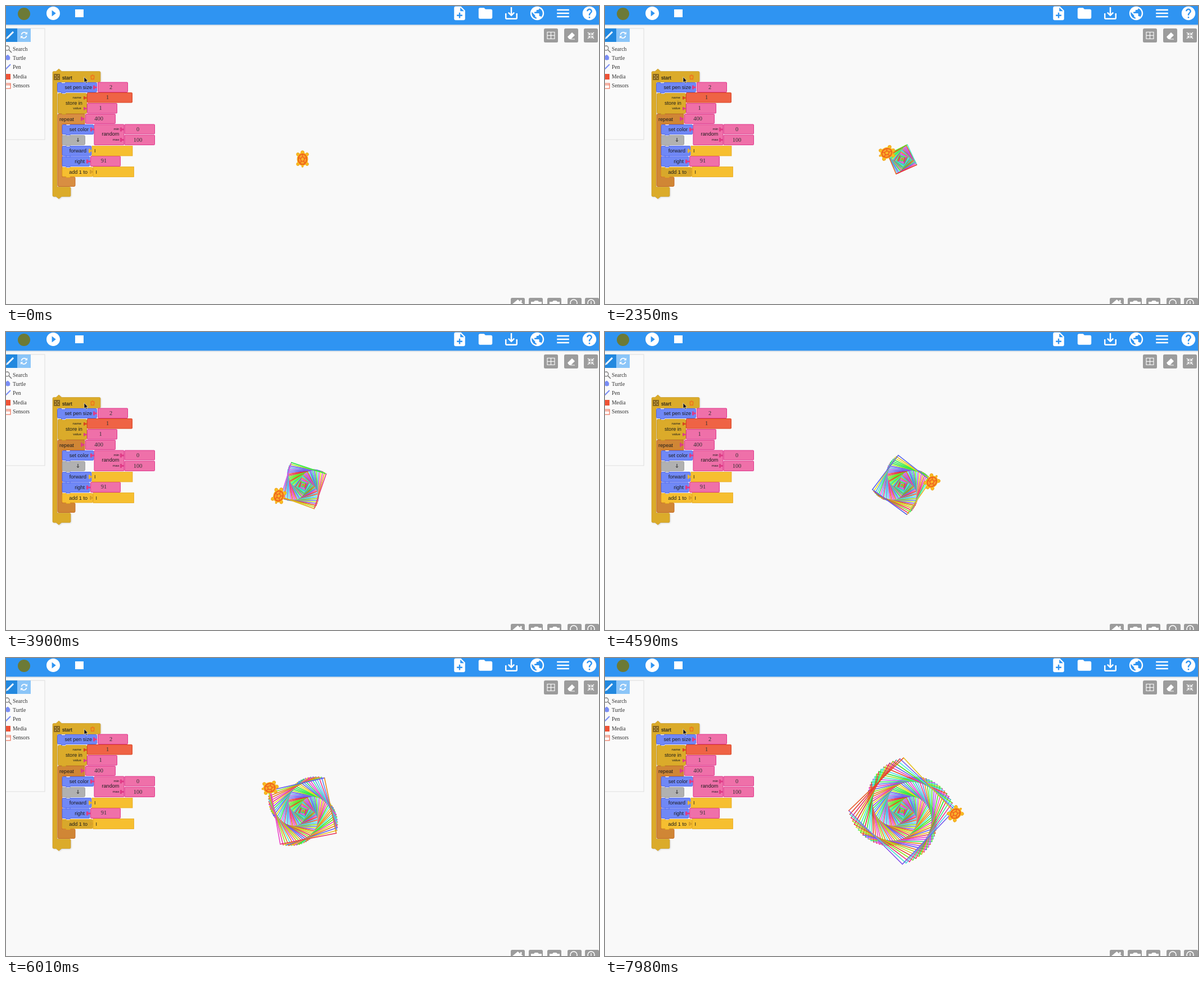
An HTML page with a canvas for the animation above (8 s loop, 1055x531 px).

```html
<!DOCTYPE html>
<html lang="en">
<head>
<meta charset="utf-8">
<title>Turtle spiral</title>
<style>
  html, body { margin: 0; width: 100%; height: 100%; overflow: hidden; background: #f9f9f9; }
  svg, canvas { position: absolute; left: 0; top: 0; }
  text { font: 9.1px "Liberation Sans", sans-serif; fill: #1c1c1c; }
  .serif { font: 10.5px "Liberation Serif", serif; fill: #333; }
  .menu { font: 9.7px "Liberation Serif", serif; fill: #333; }
  .tiny { font-size: 6.2px; }
</style>
</head>
<body>
<svg id="ui" width="1055" height="531" viewBox="0 0 1055 531"></svg>
<canvas id="stage" width="1055" height="531"></canvas>
<script>
const BLUE = ['#7088f6', '#4a63ee'], PINK = ['#ef70a9', '#e0358c'], RED = ['#ef6345', '#d8431f'],
      GOLD = ['#dbab2a', '#c6961c'], YELLOW = ['#f6bf30', '#e6a71f'], GREY = ['#b1b1b1', '#9a9a9a'],
      ORANGE = ['#d88e42', '#c4641f'];

const rect = (x, y, w, h, fill, extra = '') =>
  `<rect x="${x}" y="${y}" width="${w}" height="${h}" fill="${fill}" ${extra}/>`;
const path = (d, fill, extra = '') => `<path d="${d}" fill="${fill}" ${extra}/>`;
const line = (d, color, width, extra = '') =>
  path(d, 'none', `stroke="${color}" stroke-width="${width}" ${extra}`);
const text = (x, y, str, cls = '', anchor = 'start') =>
  `<text x="${x}" y="${y}" class="${cls}" text-anchor="${anchor}">${str}</text>`;
const icon = (cx, cy, scale, d) =>
  `<path transform="translate(${cx} ${cy}) scale(${scale}) translate(-12 -12)" fill="#fff" d="${d}"/>`;

// Value block: plain box with a centred serif number
const value = (x, y, w, h, [fill, edge], str, tx) =>
  rect(x + .5, y + .5, w - 1, h - 1, fill, `rx="1" stroke="${edge}"`) + text(tx, y + 12.3, str, 'serif', 'middle');

// Flow block: rounded box with a tab below
const block = (x, y, w, h, [fill, edge], id = '') =>
  path(`M${x + 2.5} ${y + .5}h5v1.5h7v-1.5h${w - 17}q2 0 2 2v${h - 5}q0 2 -2 2h${17 - w}v1.5h-7v-1.5h-5q-2 0 -2 -2v${5 - h}q0 -2 2 -2z`,
    fill, `stroke="${edge}" stroke-width=".9" id="${id}"`);

const plug = (x, y, color, s = 1) =>
  path(`M${x} ${y}h${3 * s}v${2 * s}h${4 * s}v${3 * s}h${-4 * s}v${2 * s}h${-3 * s}z`, color);

function toolbar() {
  const icons = [
    [807, 'M14 2H6c-1.1 0-2 .9-2 2v16c0 1.1.9 2 2 2h12c1.1 0 2-.9 2-2V8zM16 16h-3v3h-2v-3H8v-2h3v-3h2v3h3zM13 9V3.500L18.500 9z'],
    [853, 'M10 4H4c-1.100 0-2 .9-2 2v12c0 1.100.9 2 2 2h16c1.100 0 2-.9 2-2V8c0-1.100-.9-2-2-2h-8z'],
    [899, 'M19 12v7H5v-7H3v7c0 1.100.9 2 2 2h14c1.100 0 2-.9 2-2v-7zM13 12.670l2.590-2.580L17 11.500l-5 5-5-5 1.410-1.410L11 12.670V3h2z'],
    [945, 'M12 2C6.480 2 2 6.480 2 12s4.480 10 10 10 10-4.480 10-10S17.520 2 12 2zM11 19.930c-3.950-.49-7-3.850-7-7.930 0-.62.080-1.210.210-1.790L9 15v1c0 1.100.9 2 2 2zM17.900 17.390c-.26-.81-1-1.390-1.900-1.390h-1v-3c0-.55-.45-1-1-1H8v-2h2c.55 0 1-.45 1-1V7h2c1.100 0 2-.9 2-2v-.41c2.930 1.190 5 4.060 5 7.410 0 2.080-.8 3.970-2.100 5.390z'],
    [991, 'M3 18h18v-2H3zM3 13h18v-2H3zM3 8h18V6H3z'],
    [1038, 'M12 2C6.480 2 2 6.480 2 12s4.480 10 10 10 10-4.480 10-10S17.520 2 12 2zM13 19h-2v-2h2zM15.070 11.250l-.9.920C13.450 12.900 13 13.500 13 15h-2v-.5c0-1.100.45-2.100 1.170-2.830l1.240-1.260c.37-.36.59-.86.59-1.410 0-1.100-.9-2-2-2s-2 .9-2 2H8c0-2.210 1.790-4 4-4s4 1.790 4 4c0 .88-.36 1.680-.93 2.250z'],
  ];
  return rect(0, 33, 1055, 1, '#a3c6e6') + rect(0, 34, 1055, 1, '#e0e6eb') + rect(0, 35, 1055, 1, '#f1f1f1') +
    rect(0, 0, 1055, 33, '#2f94f2') +
    '<circle cx="32" cy="14" r="11" fill="#6c7a36"/>' +
    icon(84, 13, 1.2, 'M12 2C6.480 2 2 6.480 2 12s4.480 10 10 10 10-4.480 10-10S17.520 2 12 2zM10 16.500v-9l6 4.500z') +
    rect(123, 6, 15, 14, '#fff') +
    icons.map(([x, d]) => icon(x, 13, x === 991 ? 1.2 : 1.22, d)).join('');
}

function palette() {
  const names = ['Search', 'Turtle', 'Pen', 'Media', 'Sensors'];
  return rect(-1, 40, 70, 198, '#fafafa', 'stroke="#dedede"') +
    rect(0, 40, 20, 24, '#2288df') + rect(20, 40, 24, 24, '#8bc5f8') +
    line('M3.500 55.500L13 46', '#fff', 3) + path('M0 59l2 -5 3 3z', '#fff') +
    line('M27.500 51a5 5 0 0 1 9 -2M36.500 53a5 5 0 0 1 -9 2', '#fff', 1.6) +
    path('M38 46v4.500h-4.500zM26 58v-4.500h4.500z', '#fff') +
    names.map((s, i) => text(12, [79.5, 95.5, 111.5, 128.5, 145][i], s, 'menu')).join('') +
    '<circle cx="2" cy="75" r="4" fill="none" stroke="#777" stroke-width="1.3"/>' + line('M5 78l5 5', '#777', 1.6) +
    '<ellipse cx="3" cy="92" rx="4" ry="4.500" fill="#7a8ef5"/>' + line('M-1 89l8 6M3 87l2 9M7 91l-3 4', '#7a8ef5', 1.8) +
    line('M-1 113L8 104', '#7a8ef5', 2) +
    rect(-2, 121, 10, 10, '#ee5336') + rect(-3, 138, 11, 9, '#fff', 'stroke="#ee7a62" stroke-width="1.3"') +
    line('M-3 140.500h11', '#ee7a62', 1.4);
}

function sideButtons() {
  const box = (x, y) => rect(x, y, 25, 25, '#9c9c9c', 'rx="2.500"');
  return [957, 993, 1028].map(x => box(x, 40)).join('') +
    line('M963 46.500h13v12h-13zM969.500 46.500v12M963 52.500h13', '#fff', 1.1) +
    path('M999 55l8 -8 5 5 -7 7h-3z', '#fff') + line('M1004 59h8', '#fff', 1) +
    line('M1035 47l4 4v-3.500M1039 51h-3.500M1046 47l-4 4v-3.500M1042 51h3.500M1035 58l4 -4v3.500M1039 54h-3.500M1046 58l-4 -4v3.500M1042 54h3.500', '#fff', 1.2) +
    [898, 930, 963, 999, 1030].map(x => box(x, 520)).join('') +
    path('M901 531l9.500 -8 9.500 8z', '#fff') + rect(915, 524, 2.500, 4, '#fff') +
    path('M934 531v-4h5l2 -2h5l2 2h5v4zM967 531v-4h5l2 -2h5l2 2h4v4z', '#fff') +
    [1010, 1041].map(x => `<circle cx="${x}" cy="529" r="6" fill="none" stroke="#fff" stroke-width="1.600"/>`).join('') +
    line('M1041 526v5', '#fff', 1.4);
}

function program() {
  const [gold, goldEdge] = GOLD;
  const pinkPlug = (x, y, s) => plug(x, y, '#df3b86', s);
  return path('M85 116.500h4l5 -4.500 5 4.500h67q2 0 2 2v15q0 2 -2 2h-75v187h22q2 0 2 2v13q0 2 -2 2h-14l-5 4 -5 -4h-4q-2 0 -2 -2v-219q0 -2 2 -2z',
      gold, `stroke="${goldEdge}" stroke-width=".6" style="filter:drop-shadow(1px 1px 1px #0002)"`) +
    rect(85, 121, 11, 11, '#8a671c') +
    line('M87 123l2.500 2.500M94 123l-2.500 2.500M87 130l2.500 -2.500M94 130l-2.500 -2.500', '#f0d58a', 1) +
    `<g stroke="#1c1c1c" stroke-width=".15">${text(100, 130.5, 'start')}</g>` +
    '<ellipse cx="154" cy="127" rx="2.800" ry="3.500" fill="#e9a11f" stroke="#ec7620" stroke-width="1.500"/>' +
    line('M154 122v2M150.500 124l1 1M157.500 124l-1 1M151 131l1 -1M157 131l-1 -1', '#ec7620', 1.2) +

    path('M94 192.500h46v18h-40v94h21q2 0 2 2v13q0 2 -2 2h-27q-2 0 -2 -2v-125q0 -2 2 -2z',
      ORANGE[0], `stroke="${ORANGE[1]}" stroke-width=".9" id="repeat"`) +
    `<g id="repeatHot" display="none">${rect(99, 196, 36, 12, '#ecab2d') + rect(99, 304.5, 23, 16.5, '#f0ad2d', 'stroke="#e4761e"') +
      rect(99, 322, 15, 13, '#efb22c')}</g>` +
    text(95, 205.3, 'repeat') + pinkPlug(133, 197.5) + value(141, 192, 54, 18, PINK, '400', 165) +

    block(92, 155, 52, 37, GOLD) + text(106, 175.7, 'store in') +
    text(134, 164.7, 'name', 'tiny', 'end') + text(134, 184.2, 'value', 'tiny', 'end') +
    plug(138, 161, '#d8431f', .8) + pinkPlug(138, 180, .8) +
    value(144, 154, 81, 18.5, RED, '1', 180.5) + value(144, 173, 54, 18.5, PINK, '1', 168) +

    block(91, 136, 71, 18, BLUE) + text(153, 148, 'set pen size', '', 'end') + pinkPlug(155, 141.5) +
    value(163, 135.5, 54, 18.5, PINK, '2', 186.5) +

    block(99.5, 267.5, 50, 18.5, BLUE) + text(140, 280, 'right', '', 'end') + pinkPlug(143, 273.5) +
    value(150, 267, 54, 19, PINK, '91', 174) +
    block(99.5, 287, 55.5, 17.5, YELLOW, 'add') + text(145, 299, 'add 1 to', '', 'end') + plug(149, 292, '#d9a028') +
    rect(155, 286.500, 72.500, 18, YELLOW[0], `stroke="${YELLOW[1]}" stroke-width=".8"`) + text(159.5, 299, 'I') +
    block(99.5, 249, 53, 18, BLUE) + text(143, 261, 'forward', '', 'end') + plug(147, 254.5, '#e9b42e') +
    rect(153, 249.500, 72, 17.500, YELLOW[0], `stroke="${YELLOW[1]}" stroke-width=".8"`) + text(157, 261, 'I') +
    block(99.5, 230, 41.5, 18, GREY) + line('M128 235v6.500M126 239.500l2 2 2 -2', '#222', 1) +
    block(99.5, 211, 57, 18, BLUE) + text(147, 223, 'set color', '', 'end') + pinkPlug(150, 216.5) +

    rect(157, 211, 53, 36.500, PINK[0], `rx="1" stroke="${PINK[1]}"`) + text(170.5, 231.3, 'random') +
    text(201.5, 221.3, 'min', 'tiny', 'end') + text(201.5, 240.3, 'max', 'tiny', 'end') +
    pinkPlug(203, 216.5) + pinkPlug(203, 235) +
    value(210.5, 210.5, 54.5, 18, PINK, '0', 234.5) + value(210.5, 229.5, 54.5, 18.5, PINK, '100', 234.5) +
    path('M139 126.500v10l2.300 -2.200 1.700 3.700 1.600 -.7 -1.700 -3.600h3.100z', '#111', 'stroke="#fff" stroke-width=".6"');
}

document.getElementById('ui').innerHTML = toolbar() + palette() + sideButtons() + program();

const addBlock = document.getElementById('add'), repeatBlock = document.getElementById('repeat'),
      repeatHot = document.getElementById('repeatHot'), ctx = document.getElementById('stage').getContext('2d');

const LOOP = 8000, TICK = 60, TURN = 91, UNIT = 0.597, MAX_STEPS = 230;
const PACE = [[120, 0], [1260, 35], [2340, 68], [3900, 111], [5160, 147], [6000, 171], [7980, 228]];
const rad = deg => deg * Math.PI / 180;

let seed = 4321;
const random = () => (seed = seed * 16807 % 2147483647) / 2147483647;

// Blues are lifted so that all hues look about equally bright
function penColor() {
  const hue = random() * 360;
  return `hsl(${hue} 80% ${57 - 7 * Math.cos(rad(hue - 60))}%)`;
}

const points = [{ x: 528.2, y: 273 }];
for (let n = 1; n <= MAX_STEPS; n++) {
  const { x, y } = points[n - 1], a = rad((n - 1) * TURN);
  points.push({ x: x + n * UNIT * Math.sin(a), y: y - n * UNIT * Math.cos(a), color: penColor() });
}

function stepsAt(t) {
  const i = PACE.findIndex(([end]) => t <= end);
  if (i === 0) return 0;
  const [t0, n0] = PACE[i - 1], [t1, n1] = PACE[i];
  return Math.floor(n0 + (n1 - n0) * (t - t0) / (t1 - t0) + 1e-6);
}

function disc(x, y, rx, ry, fill, stroke) {
  ctx.beginPath();
  ctx.ellipse(x, y, rx, ry, 0, 0, 7);
  if (fill) { ctx.fillStyle = fill; ctx.fill(); }
  if (stroke) { ctx.strokeStyle = stroke; ctx.stroke(); }
}

function drawTurtle({ x, y }, heading) {
  const shell = '#f0641d', skin = '#f8bd20';
  ctx.save();
  ctx.translate(x - .7, y);
  ctx.rotate(rad(heading));
  ctx.lineWidth = 1;
  for (const sx of [-1, 1]) for (const sy of [-1, 1]) disc(sx * 8.2, sy * 8.7, 2.6, 2.8, skin, '#f3a51d');
  disc(0, -12, 3, 3.2, skin, '#f3a51d');
  disc(0, 12.5, 1.5, 2, skin, '#f3a51d');
  disc(0, 0, 10, 11.8, skin);
  ctx.lineWidth = 2.1;
  disc(0, 0, 7.6, 9.2, '#f9a72a', shell);
  ctx.lineWidth = 1.6;
  disc(0, 0, 3.2, 3.7, '#f9b52a', shell);
  ctx.beginPath();
  for (let i = 0; i < 5; i++) {
    const a = rad(i * 72), s = Math.sin(a), c = Math.cos(a);
    ctx.moveTo(s * 3.2, -c * 3.7);
    ctx.lineTo(s * 7.6, -c * 9.2);
  }
  ctx.stroke();
  ctx.restore();
}

function highlight(t) {
  const inRepeat = t >= 5150 && t < 5210;
  const inAdd = t >= 520 && t < 7660 && (t - 520) % 915 < 60;
  addBlock.setAttribute('fill', inRepeat ? '#ecad2d' : inAdd ? '#d8a82b' : YELLOW[0]);
  repeatHot.setAttribute('display', inRepeat ? 'inline' : 'none');
  repeatBlock.setAttribute('fill', t < 90 ? ORANGE[0] : '#d08635');
}

function draw(now) {
  const t = now % LOOP;
  const n = stepsAt(Math.min(Math.floor((t + 10) / TICK) * TICK, 7980));
  ctx.clearRect(0, 0, 1055, 531);
  ctx.lineWidth = 1.6;
  ctx.lineCap = 'round';
  for (let i = 1; i <= n; i++) {
    ctx.strokeStyle = points[i].color;
    ctx.beginPath();
    ctx.moveTo(points[i - 1].x, points[i - 1].y);
    ctx.lineTo(points[i].x, points[i].y);
    ctx.stroke();
  }
  drawTurtle(points[n], n * TURN);
  highlight(t);
}

const start = performance.now();
function frame() {
  draw(performance.now() - start);
  requestAnimationFrame(frame);
}
frame();
</script>
</body>
</html>
```
